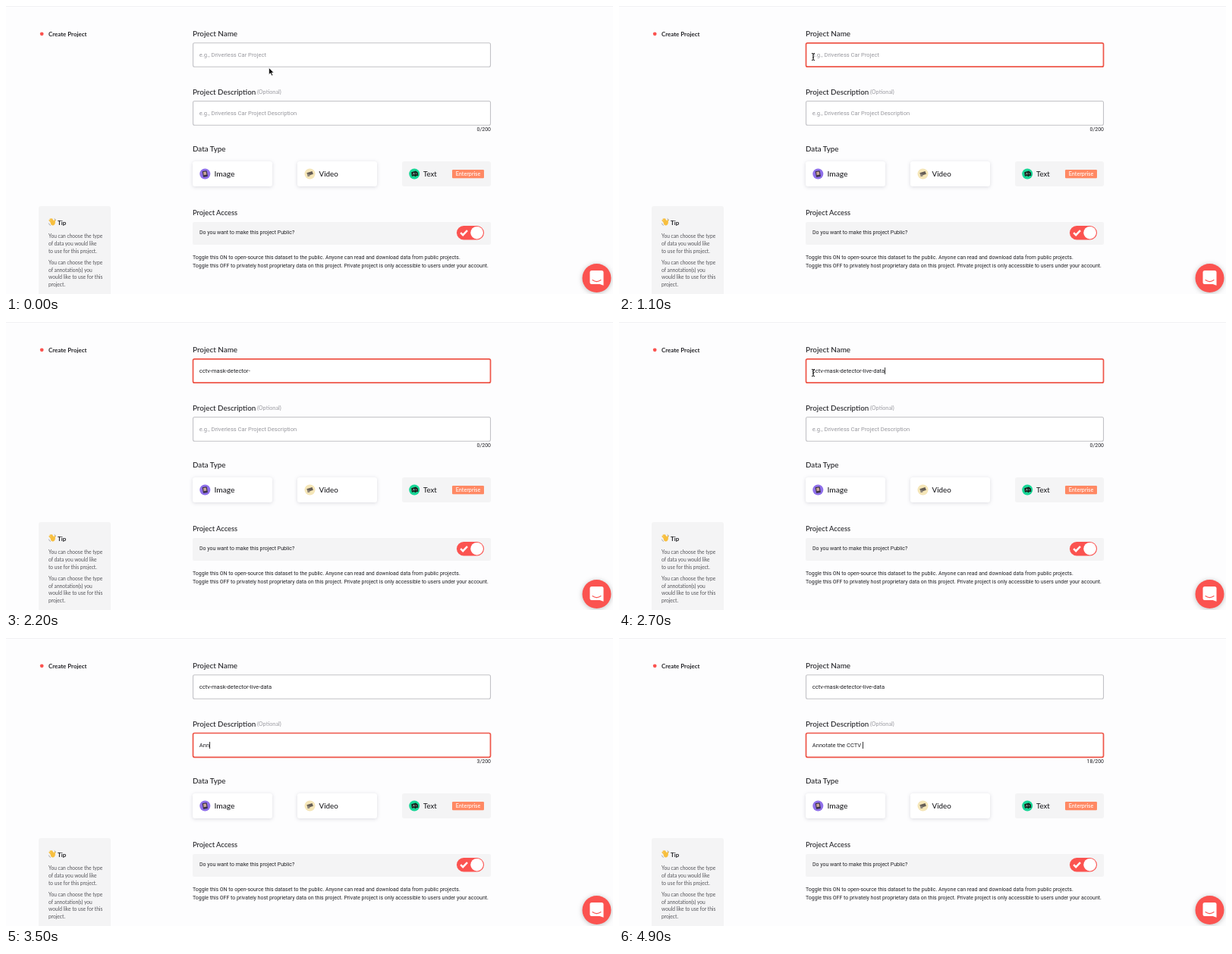
Animation of 800x380 px, one loop 5000 ms. Source, as an HTML page:

```html
<!DOCTYPE html>
<html lang="en">
<head>
<meta charset="utf-8">
<style>
  html, body { margin: 0; width: 100%; height: 100%; overflow: hidden; background: #fdfdfe; }
  svg { display: block; }
  text { white-space: pre; font-family: Roboto, Arial, sans-serif; font-size: 6.96px; fill: #222226; }
  .h { font-family: Lato, sans-serif; font-size: 9.8px; font-weight: 500; }
  .b { font-family: Lato, sans-serif; font-size: 7.9px; font-weight: 700; }
  .tip text { font-family: Lato, sans-serif; font-size: 6.65px; fill: #55555a; }
  .val { font-size: 7.58px; }
  .card { fill: #fff; filter: drop-shadow(0 1px 2.5px rgba(40, 40, 70, .16)); }
  .grey { fill: #f4f4f5; }
  .red { fill: #fb5350; }
</style>
</head>
<body>
<svg width="800" height="380" viewBox="0 0 800 380">
  <rect width="800" height="1" fill="#f1f1f3"/>
  <circle class="red" cx="47.2" cy="36.8" r="2.4"/>
  <text class="b" x="56" y="40">Create Project</text>

  <rect class="grey" x="43" y="264" width="95" height="120" rx="3"/>
  <g fill="#f7bf3f" stroke="#f7bf3f" stroke-width="1.7" stroke-linecap="round">
    <ellipse cx="61.7" cy="286.3" rx="2.9" ry="3.1" stroke="none"/>
    <path d="M60 286L57.2 282.8M61 284.5L58.4 281.2M62.4 284L60.2 281M63.7 286L64.4 282.6"/>
    <path d="M56.5 287q.4 1.8 2 2.4M64 280.7q1.2.6 1.5 1.8" fill="none" stroke="#777" stroke-width=".6"/>
  </g>
  <text class="b" x="68" y="288.5">Tip</text>
  <g class="tip">
    <text x="56" y="306.3">You can choose the type</text>
    <text x="56" y="316">of data you would like</text>
    <text x="56" y="325.6">to use for this project.</text>
    <text x="56" y="341.3">You can choose the type</text>
    <text x="56" y="350.9">of annotation(s) you</text>
    <text x="56" y="360.4">would like to use for this</text>
    <text x="56" y="370">project.</text>
  </g>

  <text class="h" x="246" y="40.3" style="font-size:9.9px">Project Name</text>
  <text class="h" x="246" y="117">Project Description</text>
  <text class="h" x="331" y="116.3" style="font-size:7.3px;fill:#a2a2a8">(Optional)</text>
  <text class="h" x="246" y="191.8">Data Type</text>
  <text class="h" x="246" y="276" style="font-size:9.3px">Project Access</text>

  <rect class="box" x="246.5" y="48.8" width="392" height="31.4" rx="2" fill="#fff"/>
  <rect class="box" x="246.5" y="125.5" width="392" height="31.8" rx="2" fill="#fff"/>
  <text class="val" x="254.8" y="67.3"></text>
  <text class="val" x="254.8" y="144.2"></text>
  <text id="count" x="639" y="165.2" text-anchor="end"></text>
  <rect id="caret" width=".9" height="9" fill="#222"/>

  <rect class="card" x="246" y="205" width="105" height="33" rx="3"/>
  <circle cx="262.3" cy="221.5" r="7" fill="#8f70ea"/>
  <g transform="rotate(-10 262.3 221.5)">
    <rect x="259.3" y="217.5" width="6" height="8" rx=".6" fill="#3a3148"/>
    <rect x="260.4" y="218.7" width="3.8" height="4.2" fill="#c8a596"/>
  </g>
  <text class="h" x="274.5" y="225" style="font-size:10.2px">Image</text>

  <rect class="card" x="384" y="205" width="105" height="33" rx="3"/>
  <circle cx="400.5" cy="221.5" r="7" fill="#f5e6b8"/>
  <path d="M396.3 220.2l7.2-2.2 1.4 3.8-7 2.2z" fill="#655d56"/>
  <path d="M397.5 221v4.2l3-.8v-2" fill="#8d857b"/>
  <text class="h" x="412.5" y="225">Video</text>

  <rect class="grey" x="522" y="205" width="117" height="33" rx="3"/>
  <circle cx="538.2" cy="221.5" r="7" fill="#18d797"/>
  <path d="M534.2 219.2l6-1.8 2.7 2.3.4 4.6-2-.6-1.7 1.6-1.7-1.4-3 .8z" fill="#17251f"/>
  <path d="M536.5 222.5l1-2.4 1 2.3M540 220.3l1.3 1.8" fill="none" stroke="#dff" stroke-width=".6"/>
  <text class="h" x="550" y="225" style="font-size:9.5px">Text</text>
  <rect x="588" y="216" width="42" height="11.3" rx="1.2" fill="#ff8964"/>
  <text class="h" x="609" y="224.2" text-anchor="middle" style="font-size:7.2px;fill:#fff">Enterprise</text>

  <rect class="grey" x="246" y="285" width="393" height="30" rx="2"/>
  <text x="255" y="301.3">Do you want to make this project Public?</text>
  <rect class="red" x="594" y="290" width="36" height="18.4" rx="9.2"/>
  <circle cx="620.6" cy="299.2" r="8.3" fill="#fff"/>
  <path d="M599.2 299.2l3 3 5.8-6" fill="none" stroke="#fff" stroke-width="2.5"/>

  <text x="246" y="334.3">Toggle this ON to open-source this dataset to the public. Anyone can read and download data from public projects.</text>
  <text x="246" y="344.5">Toggle this OFF to privately host proprietary data on this project. Private project is only accessible to users under your account.</text>

  <circle class="red" cx="778.5" cy="359" r="19" style="filter:drop-shadow(0 1px 3px rgba(0,0,0,.25))"/>
  <path d="M772 349h13a2.5 2.5 0 0 1 2.5 2.5v17.2l-4.8-1.7H772a2.5 2.5 0 0 1-2.5-2.5v-13a2.5 2.5 0 0 1 2.5-2.5z" fill="#fff"/>
  <path d="M773 361.6q5.5 4 11 0" fill="none" stroke="#fb5350" stroke-width="1.2" stroke-linecap="round"/>

  <path id="arrow" d="M0 0v9l2.1-1.9 1.5 3.3 1.6-.7-1.5-3.2H6.5z" fill="#111" stroke="#fff" stroke-width=".6"/>
  <path id="beam" d="M-2-4.6q2 0 2 1.2q0-1.2 2-1.2M0-3.5v7M-2 4.6q2 0 2-1.2q0 1.2 2 1.2M-1 1h2" fill="none" stroke="#111" stroke-width="1"/>
</svg>
<script>
const $ = id => document.getElementById(id);
const boxes = document.querySelectorAll('.box'), vals = document.querySelectorAll('.val');
const LOOP = 5000, BLINK = 255, FOCUS = [600, 2900];
const hints = ['e.g., Driverless Car Project', 'e.g., Driverless Car Project Description'];
// Bursts of typing: field, start, ms per key, text
const bursts = [
  [0, 1200, 39, 'cctv-mask-detector-'],
  [0, 2250, 45, 'live-data'],
  [1, 3300, 60, 'Annotate the CCTV ']
];
// Pointer moves: start, end, from, to
const moves = [
  [0, 600, [346.5, 81.5], [256, 67]],
  [2700, 2900, [256, 67], [268, 150.5]]
];

function drawPointer(t) {
  const [a, b, from, to] = moves[t < 2700 ? 0 : 1];
  const k = Math.min(1, (t - a) / (b - a)), e = k * k * (3 - 2 * k);
  const [x, y] = from.map((v, i) => v + (to[i] - v) * e);
  const shown = t < 1240 || (t >= 2700 && t < 3360);
  const inField = (y > 48 && y < 80) || (y > 125 && y < 158);
  for (const [el, on] of [[$('arrow'), !inField], [$('beam'), inField]]) {
    el.setAttribute('transform', `translate(${x} ${y})`);
    el.style.display = shown && on ? '' : 'none';
  }
}

function draw(now) {
  const t = now % LOOP, typed = ['', ''];
  const active = t >= FOCUS[1] ? 1 : t >= FOCUS[0] ? 0 : -1;
  let lastKey = FOCUS[active];
  for (const [field, start, pace, str] of bursts) {
    const n = Math.max(0, Math.min(str.length, Math.floor((t - start) / pace)));
    typed[field] += str.slice(0, n);
    if (n && field === active) lastKey = start + n * pace;
  }
  vals.forEach((el, i) => {
    el.textContent = typed[i] || hints[i];
    el.style.fill = typed[i] ? '#222226' : '#98989e';
    boxes[i].setAttribute('stroke', i === active ? '#ee5548' : '#c2c2c6');
    boxes[i].setAttribute('stroke-width', i === active ? 1.7 : 1.1);
  });
  $('count').textContent = typed[1].length + '/200';

  const on = active >= 0 && Math.floor((t - lastKey) / BLINK) % 2 === 0;
  $('caret').style.display = on ? '' : 'none';
  if (on) {
    const w = typed[active] ? vals[active].getComputedTextLength() : 0;
    $('caret').setAttribute('x', 254.8 + w);
    $('caret').setAttribute('y', active ? 137 : 60);
  }
  drawPointer(t);
}

let begin;
function tick(now) {
  begin ??= now;
  draw(now - begin);
  requestAnimationFrame(tick);
}
draw(0);
requestAnimationFrame(tick);
</script>
</body>
</html>
```
